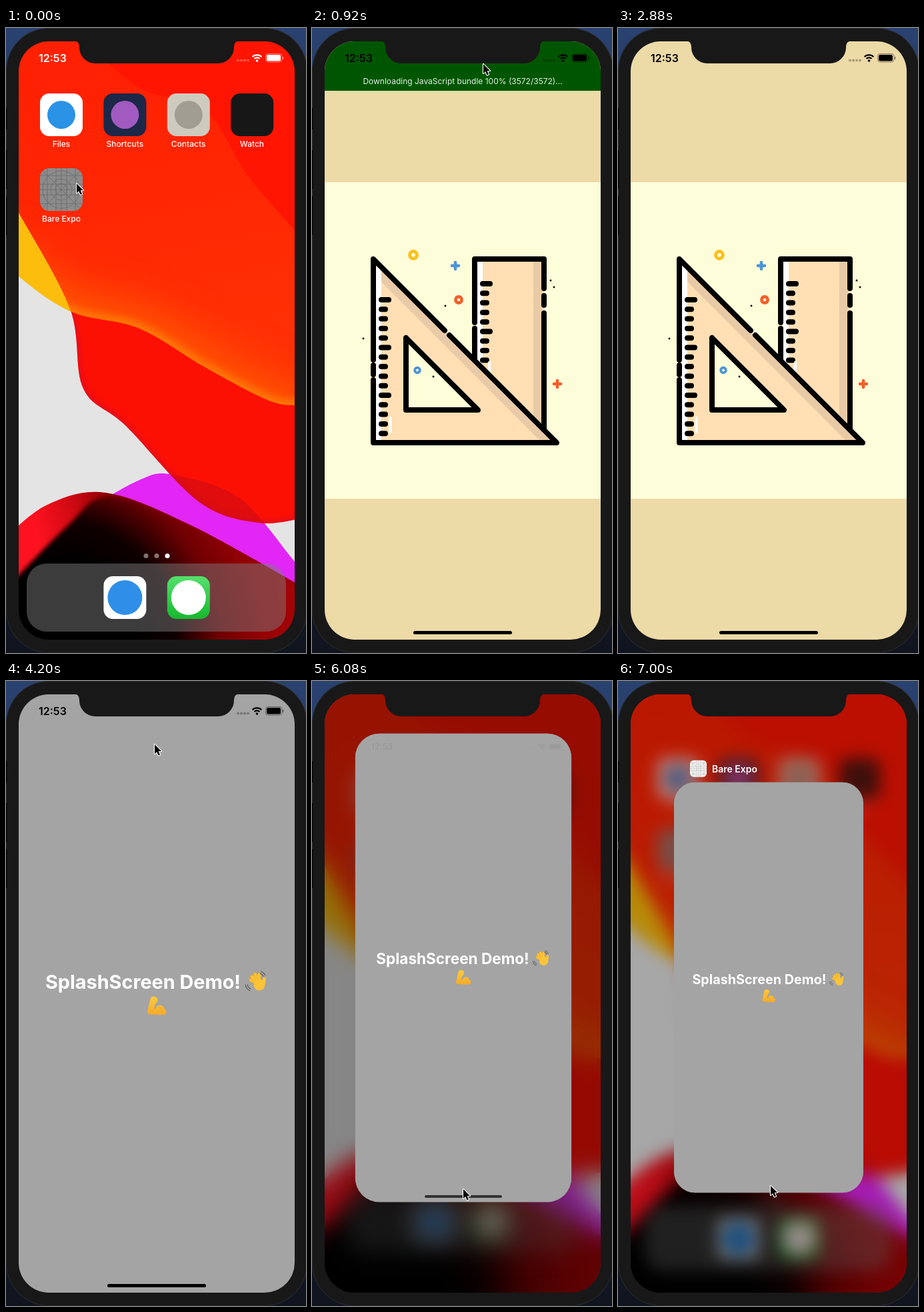
Animation of 450 by 936 pixels, one loop 7040 ms. Source, as an HTML page with a canvas:

```html
<!DOCTYPE html>
<html lang="en">
<head>
<meta charset="utf-8">
<title>Splash screen demo</title>
<style>
html, body { margin: 0; width: 100%; height: 100%; overflow: hidden; background: #181818; }
canvas { display: block; width: 450px; height: 936px; }
</style>
</head>
<body>
<canvas id="stage" width="450" height="936"></canvas>
<script>
const W = 450, H = 936, LOOP = 7040, STEP = 40;
const SCREEN = { x: 19, y: 20, w: 414, h: 896 };
const FONT = 'Inter, Roboto, sans-serif';
const ctx = document.getElementById('stage').getContext('2d');

const clamp = v => Math.max(0, Math.min(1, v));
const lerp = (a, b, p) => a + (b - a) * p;
const span = (t, a, b) => clamp((t - a) / (b - a));
const smooth = p => p * p * (3 - 2 * p);
const easeOut = p => 1 - (1 - p) ** 3;
const spring = x => 1 - (1 + x) * Math.exp(-x);

function layer(paint) {
  const cv = document.createElement('canvas');
  cv.width = W;
  cv.height = H;
  paint(cv.getContext('2d'));
  return cv;
}

function rrect(c, x, y, w, h, r, fill) {
  c.beginPath();
  c.roundRect(x, y, w, h, r);
  if (fill) { c.fillStyle = fill; c.fill(); }
}

function disc(c, x, y, r, fill) {
  c.beginPath();
  c.arc(x, y, r, 0, 7);
  c.fillStyle = fill;
  c.fill();
}

function arc(c, x, y, r, width, color, from = 0, to = 7) {
  c.beginPath();
  c.arc(x, y, r, from, to);
  c.lineWidth = width;
  c.lineCap = 'butt';
  c.strokeStyle = color;
  c.stroke();
}

function trace(c, pts) {
  c.beginPath();
  for (let i = 0; i < pts.length; i += 2) c.lineTo(pts[i], pts[i + 1]);
}

function poly(c, pts, fill) {
  trace(c, pts);
  c.closePath();
  c.fillStyle = fill;
  c.fill();
}

function line(c, pts, width, color) {
  trace(c, pts);
  c.lineWidth = width;
  c.strokeStyle = color;
  c.lineCap = c.lineJoin = 'round';
  c.stroke();
}

function text(c, str, x, y, size, weight, color, align = 'center') {
  c.font = `${weight} ${size}px ${FONT}`;
  c.textAlign = align;
  c.fillStyle = color;
  c.fillText(str, x, y);
}

// Catmull-Rom edge through flat x,y points; side closes it along the bottom or the top
function curve(pts, side) {
  const p = new Path2D(), n = pts.length / 2;
  const at = i => { i = Math.max(0, Math.min(n - 1, i)); return [pts[2 * i], pts[2 * i + 1]]; };
  p.moveTo(...at(0));
  for (let i = 0; i < n - 1; i++) {
    const [a, b, d, e] = [at(i - 1), at(i), at(i + 1), at(i + 2)];
    p.bezierCurveTo(b[0] + (d[0] - a[0]) / 6, b[1] + (d[1] - a[1]) / 6,
      d[0] - (e[0] - b[0]) / 6, d[1] - (e[1] - b[1]) / 6, d[0], d[1]);
  }
  if (side) {
    const y = side === 'top' ? -10 : H + 10;
    p.lineTo(W, y);
    p.lineTo(pts[0], y);
  }
  return p;
}

function stops(g, colors) {
  colors.forEach((col, i) => g.addColorStop(i / (colors.length - 1), col));
  return g;
}

const gradient = (c, x0, y0, x1, y1, ...colors) =>
  stops(c.createLinearGradient(x0, y0, x1, y1), colors);

function glow(c, path, width, blur, color) {
  c.save();
  c.filter = `blur(${blur}px)`;
  c.lineWidth = width;
  c.strokeStyle = color;
  c.stroke(path);
  c.restore();
}

function fillPath(c, path, fill) {
  c.fillStyle = fill;
  c.fill(path);
}

const wall = layer(c => {
  const magenta = curve([120, 722, 200, 677, 250, 669, 350, 704, 433, 799, W, 815], 'bottom');
  const lobe = curve([-10, 225, 19, 276, 96, 420, 116, 540, 180, 596, 290, 710, 380, 741, W, 733], 'top');
  const bandEdge = [-10, 335, 19, 372, 98, 425, 200, 450, 300, 509, 400, 560, W, 563];
  const band = curve(bandEdge, 'top'), rim = curve(bandEdge);
  const hill = curve([-10, 772, 60, 715, 150, 696, 280, 746, W, 840], 'bottom');

  c.fillStyle = '#e4e4e5';
  c.fillRect(0, 0, W, H);
  fillPath(c, magenta, '#e226f6');
  fillPath(c, band, '#fcbd0c');
  fillPath(c, lobe, '#fd1004');

  c.save();
  c.clip(lobe);
  glow(c, lobe, 8, 4, 'rgba(205,10,50,.6)');
  fillPath(c, magenta, 'rgba(205,10,20,.6)');
  c.clip(band);
  fillPath(c, band, gradient(c, 120, 20, 200, 470, '#ff2002', '#ff2603', '#ff3004'));
  glow(c, rim, 60, 30, '#ff5a04');
  glow(c, rim, 12, 7, '#ff8a06');
  fillPath(c, curve([140, 40, 205, 92, 300, 124, 362, 220, W, 322], 'top'), '#ff1502');
  c.restore();

  fillPath(c, hill, gradient(c, 40, 740, 160, 710, '#ff1220', '#d00a12', '#8c0004'));
  c.save();
  c.clip(hill);
  const shade = c.createRadialGradient(70, 920, 120, 70, 920, 380);
  c.filter = 'blur(3px)';
  fillPath(c, curve([-10, 850, 90, 748, 155, 702, 280, 747, W, 841], 'bottom'),
    stops(shade, ['#000', '#100000', '#6e0002', '#960204', '#a80406']));
  c.restore();
});

function gridIcon(c, x, y, size, pressed) {
  c.save();
  c.translate(x, y);
  c.scale(size / 64, size / 64);
  rrect(c, 0, 0, 64, 64, 14, pressed ? '#8c8c8c' : '#f4f4f4');
  c.clip();
  const ink = pressed ? '#6b6b6b' : '#a8a8a8';
  for (const v of [11, 24, 32, 40, 53]) {
    line(c, [v, 0, v, 64], .8, ink);
    line(c, [0, v, 64, v], .8, ink);
  }
  line(c, [0, 0, 64, 64], .8, ink);
  line(c, [64, 0, 0, 64], .8, ink);
  for (const r of [9, 16, 28]) arc(c, 32, 32, r, .8, ink);
  c.restore();
}

const icons = layer(c => {
  const APPS = [['Files', '#fff', '#2b93e6'], ['Shortcuts', '#1d2748', '#a05ac0'],
    ['Contacts', '#cfcabe', '#a29d92'], ['Watch', '#171717', '#171717']];
  const DOCK = [['#fff', '#2f8fe8'], [gradient(c, 0, 821, 0, 885, '#55e06c', '#17b82e'), '#fff']];
  const app = (col, y, tile, mark, r) => {
    const x = 51 + col * 95.4;
    rrect(c, x, y, 64, 64, 14, tile);
    disc(c, x + 32, y + 32, r, mark);
  };
  rrect(c, 31, 802, 389, 102, 30, 'rgba(125,125,128,.48)');
  for (let i = 0; i < 3; i++) disc(c, 210 + i * 16, 790.5, 3.5, i < 2 ? 'rgba(255,255,255,.45)' : '#fff');
  APPS.forEach(([name, tile, mark], i) => {
    app(i, 98, tile, mark, 21);
    text(c, name, 83 + i * 95.3, 178, 12, 500, '#fff');
  });
  DOCK.forEach(([tile, mark], i) => app(i + 1, 821, tile, mark, 26));
  gridIcon(c, 51, 210, 64, true);
  text(c, 'Bare Expo', 83, 290, 12, 500, '#fff');
});

function status(c, color, alpha = 1) {
  const base = c.globalAlpha * alpha;
  c.save();
  c.globalAlpha = base;
  text(c, '12:53', 49, 50.5, 16, 600, color, 'left');
  rrect(c, 391, 40, 21, 9.5, 2.5, color);
  disc(c, 376.5, 49, 1.8, color);
  for (const r of [5.6, 9.6]) arc(c, 376.5, 50, r, 2.3, color, -Math.PI * .75, -Math.PI * .25);
  c.globalAlpha = base * .28;
  for (let i = 0; i < 4; i++) disc(c, 348 + i * 5, 48.5, 2, color);
  c.globalAlpha = base * .45;
  rrect(c, 389.5, 38.5, 24.5, 12.5, 4);
  c.lineWidth = 1;
  c.strokeStyle = color;
  c.stroke();
  rrect(c, 414.8, 43, 1.6, 4, 1, color);
  c.restore();
}

const splash = layer(c => {
  const ink = '#000', peach = '#ffdfb3', cream = '#fdfdda', shade = '#e8cba6';
  const box = (x, y, w, h, fill) => { c.fillStyle = fill; c.fillRect(x, y, w, h); };
  const stroke = (...pts) => line(c, pts, 8, ink);
  const upright = (x, y0, y1) => stroke(x, y0, x, y1);
  const ticks = (x, y, n) => {
    for (let i = 0; i < n; i++) stroke(x, y + i * 14.3, x + (i % 5 ? 6 : 11), y + i * 14.3);
  };
  const plus = (x, y, color) => {
    line(c, [x - 5, y, x + 5, y], 4.6, color);
    line(c, [x, y - 5, x, y + 5], 4.6, color);
  };
  box(0, 0, W, H, '#ecdaa7');
  box(0, 231, W, 474, cream);

  // Ruler
  poly(c, [244, 346, 348, 346, 348, 602, 244, 498], peach);
  box(247, 349, 9, 160, '#fff');
  box(332, 349, 13, 246, shade);
  ticks(256, 383, 9);
  line(c, [266, 501, 266, 514], 4, '#fff');
  stroke(244, 441, 244, 346, 348, 346, 348, 390);
  upright(244, 450, 497);
  upright(348, 401, 415);
  upright(348, 427, 602);

  // Set square
  poly(c, [92, 346, 92, 621, 367, 621], peach);
  box(95, 358, 9, 260, '#fff');
  poly(c, [104, 358, 367, 621, 345, 621, 104, 380], shade);
  poly(c, [141, 464, 141, 572, 249, 572], cream);
  stroke(141, 464, 141, 572, 249, 572, 141, 464);
  ticks(104, 407, 15);
  line(c, [117.5, 584, 117.5, 605], 4, '#fff');
  stroke(92, 497, 92, 346, 199, 453);
  upright(92, 505, 519);
  stroke(92, 527, 92, 621, 367, 621, 206, 460);

  const blue = '#4c94d8', orange = '#f2602a';
  arc(c, 152, 340, 5.4, 5, '#fcc01a');
  arc(c, 220, 407, 4.6, 4.6, orange);
  arc(c, 158, 512.5, 3.8, 3.8, blue);
  plus(215, 356, blue);
  plus(368, 533, orange);
  for (const [x, y] of [[77, 465], [200, 416], [182, 522], [358, 378], [363, 388]])
    disc(c, x, y, 1.5, '#111');
});

function wavingHand(c) {
  const skin = '#fcc436', seam = '#dc9420';
  for (let i = 0; i < 4; i++) {
    const a = -2.7 + i * .36, reach = 14 + 2 * Math.sin(i);
    const tip = [380 + reach * Math.cos(a), 454 + reach * Math.sin(a)];
    line(c, [380, 454, ...tip], 5.6, seam);
    line(c, [380, 454, ...tip], 4.6, skin);
  }
  disc(c, 380, 455, 8.5, skin);
  line(c, [387.5, 446, 386, 455], 4.6, skin);
  for (const r of [9, 12]) {
    arc(c, 371, 453, r, 1.3, '#5e6468', 2, 3);
    arc(c, 378, 446, r, 1.3, '#5e6468', -1.2, -.4);
  }
}

function flexedArm(c) {
  const skin = gradient(c, 0, 472, 0, 501, '#fdca3c', '#f3a92a');
  line(c, [221, 477, 216.5, 495, 236, 495.5], 9, skin);
  disc(c, 222, 478, 5.5, skin);
  disc(c, 231, 492, 6.5, skin);
}

function demo(c) {
  c.fillStyle = '#a4a4a4';
  c.fillRect(0, 0, W, H);
  text(c, 'SplashScreen Demo!', 59, 460.5, 28.8, 700, '#fff', 'left');
  wavingHand(c);
  flexedArm(c);
}

// The running app in full-screen coordinates
function app(c, t, statusAlpha = 1, barAlpha = 1) {
  const base = c.globalAlpha;
  const faded = (alpha, paint) => {
    if (alpha <= 0) return;
    c.globalAlpha = base * alpha;
    paint();
    c.globalAlpha = base;
  };
  const shown = span(t, 3560, 3680);
  faded(shown < 1 ? 1 : 0, () => c.drawImage(splash, 0, 0));
  faded(shown, () => demo(c));
  faded(t >= 720 ? 1 - span(t, 1560, 1800) : 0, () => {
    c.fillStyle = '#005600';
    c.fillRect(0, 0, W, 94);
    text(c, 'Downloading JavaScript bundle 100% (3572/3572)...', 226, 83.5, 12, 400, '#e6efe6');
  });
  status(c, '#000', statusAlpha);
  faded(barAlpha, () => rrect(c, 152, 903, 148, 5, 2.5, '#000'));
}

// Home screen behind a card: blur in pixels, light dims, zoom shrinks the icons
function home(blur, light, zoom) {
  ctx.save();
  ctx.drawImage(wall, 0, 0);
  if (blur > 0) {
    ctx.filter = `blur(${blur}px)`;
    ctx.drawImage(wall, 0, 0);
  }
  ctx.globalAlpha = 1 - blur / 45;
  ctx.translate(226, 468);
  ctx.scale(zoom, zoom);
  ctx.translate(-226, -468);
  ctx.drawImage(icons, 0, 0);
  ctx.restore();
  ctx.fillStyle = `rgba(0,0,0,${1 - light})`;
  ctx.fillRect(0, 0, W, H);
}

// Rounded window centred on cx, cy; the content keeps the screen's width and its top edge
function card(cx, cy, w, h, r, paint) {
  const s = w / SCREEN.w, x = cx - w / 2, y = cy - h / 2;
  ctx.save();
  rrect(ctx, x, y, w, h, r, '#8c8c8c');
  ctx.clip();
  ctx.translate(x, y);
  ctx.scale(s, s);
  ctx.translate(-SCREEN.x, -SCREEN.y);
  paint(ctx);
  ctx.restore();
}

function launch(t) {
  const sec = Math.max(0, t - 80) / 1000;
  const p = spring(15.8 * sec), ph = spring(13.6 * sec);
  const k = span(t, 40, 240);
  home(13 * k, lerp(1, .52, k), 1 - .073 * p);
  status(ctx, '#fff', lerp(1, .3, k));
  if (t < 80) return;
  card(lerp(83, 226, p), lerp(242, 468, p), lerp(64, 414, p), lerp(64, 896, ph), lerp(14, 54, p), c => {
    c.globalAlpha = span(t, 60, 200);
    app(c, t, 1, span(t, 400, 600));
  });
}

function switcher(t) {
  const drag = smooth(span(t, 5240, 6080)), settle = smooth(easeOut(span(t, 6160, 6960)));
  const mix = (start, held, end) => lerp(lerp(start, held, drag), end, settle);
  const s = mix(1, .783, .686), cx = mix(226, 227, 226), cy = mix(468, 429.5, 459);
  home(mix(17, 17, 12), mix(.5, .59, .73), mix(.89, .89, .953));
  card(cx, cy, 414 * s, 896 * s, 46 * s, c => app(c, t, mix(1, .06, 0), mix(1, .7, 0)));
  const top = cy - 448 * s;
  ctx.save();
  ctx.globalAlpha = span(settle, .4, 1);
  gridIcon(ctx, 108, top - 33, 25, false);
  text(ctx, 'Bare Expo', 141, top - 15, 14, 600, '#fff', 'left');
  ctx.restore();
}

// Pointer stops as [time, x, y]; it is away between the two visits
const VISITS = [
  [[0, 106, 233], [480, 106, 233], [920, 257, 54], [1480, 257, 54], [1640, 266, -24]],
  [[4200, 223, 95], [5120, 227, 908], [5240, 227, 908], [6080, 227, 761], [6960, 229, 756], [LOOP, 229, 756]]
];
const ARROW = [0, 0, 0, 14, 3.2, 11.2, 5.6, 16.6, 8, 15.5, 5.7, 10.3, 10, 10, 0, 0];

function pointer(t) {
  for (const keys of VISITS) {
    const i = keys.findIndex(k => t < k[0]);
    if (i < 1) continue;
    const [a, b] = [keys[i - 1], keys[i]], p = smooth(span(t, a[0], b[0]));
    ctx.save();
    ctx.translate(lerp(a[1], b[1], p), lerp(a[2], b[2], p));
    line(ctx, ARROW, 2.2, '#fff');
    poly(ctx, ARROW, '#000');
    ctx.restore();
  }
}

function phone() {
  ctx.fillStyle = gradient(ctx, 0, 0, 0, H, '#2a4270', '#1b2848', '#10141f');
  ctx.fillRect(0, 0, W, H);
  rrect(ctx, 0, 0, 452, 936, 64, '#2a2a2c');
  rrect(ctx, 1, 1, 450, 934, 63, '#181818');
  ctx.fillStyle = '#050505';
  for (const [y, h] of [[120, 32], [183, 58], [252, 58]]) ctx.fillRect(0, y, 1.5, h);
}

function notch() {
  rrect(ctx, 110, 10, 232, 43, [0, 0, 24, 24], '#181818');
  for (const side of [-1, 1]) {
    const x = 226 + side * 116;
    ctx.beginPath();
    ctx.moveTo(x, 19);
    ctx.lineTo(x + side * 8, 19);
    ctx.quadraticCurveTo(x, 20, x, 28);
    ctx.fill();
  }
}

function draw() {
  const t = Math.floor(performance.now() % LOOP / STEP) * STEP;
  phone();
  ctx.save();
  rrect(ctx, SCREEN.x, SCREEN.y, SCREEN.w, SCREEN.h, 45);
  ctx.clip();
  if (t < 680) launch(t);
  else if (t <= 5240) app(ctx, t);
  else switcher(t);
  ctx.restore();
  notch();
  pointer(t);
  requestAnimationFrame(draw);
}
draw();
</script>
</body>
</html>
```
